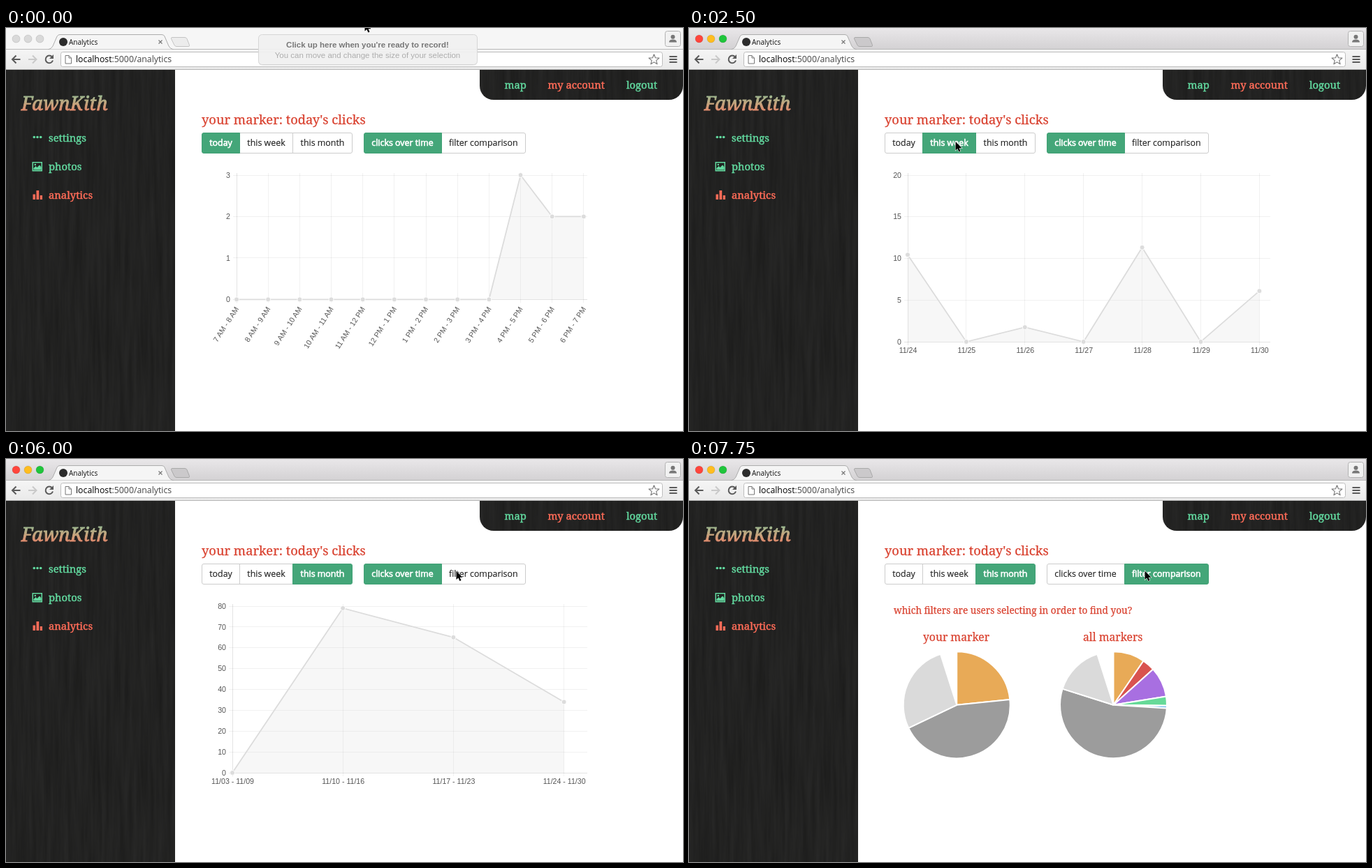
Write an HTML page that moves like this. It is 969 px wide and 578 px high and loops after 8000 ms.

```html
<!DOCTYPE html>
<html lang="en">
<head>
<meta charset="utf-8">
<title>Analytics</title>
<style>
  html, body { margin: 0; width: 100%; height: 100%; overflow: hidden; background: #fff; }
  #stage { position: absolute; left: 0; top: 0; width: 969px; height: 578px; overflow: hidden; }
  svg { position: absolute; left: 0; top: 0; }
  text { white-space: pre; }
  .ui { font-family: "Open Sans", sans-serif; }
  .slab { font-family: "Noto Serif", serif; }
  .red { fill: #d9412f; stroke: #d9412f; stroke-width: .25px; }
  .menu { font-size: 14.8px; stroke-width: .45px; }
  .mint { fill: #62d99f; stroke: #62d99f; }
  .coral { fill: #ff6c58; stroke: #ff6c58; }
  .axis text { font: 10.6px "Liberation Sans", Arial, sans-serif; fill: #555; }
  .grid { stroke: #000; stroke-opacity: .055; }
  .lead { stroke-opacity: .11; }
  .area { fill: #dcdcdc; fill-opacity: .22; }
  .line { fill: none; stroke: #dcdcdc; stroke-width: 1.8; }
  .dot { fill: #dcdcdc; stroke: #fff; }
  .pie path { stroke: #fff; stroke-width: 2; stroke-linejoin: bevel; }
  .icon { fill: none; stroke: #5a5a5a; stroke-width: 2; }

  .btn {
    position: absolute; top: 150px; height: 30px; box-sizing: border-box;
    display: flex; align-items: center; justify-content: center;
    border: 1px solid #ccc; background: #fff; color: #222;
    font: 12.4px "Open Sans", sans-serif; white-space: nowrap; padding-bottom: 1px;
    -webkit-text-stroke: .15px #222;
  }
  .btn.first { border-radius: 3px 0 0 3px; }
  .btn.last { border-radius: 0 3px 3px 0; }
  .btn.on {
    background: #44a679; border-color: #42a176; color: #fff; z-index: 1;
    -webkit-text-stroke: .65px #fff;
  }
  .btn.down {
    background: #d4d4d4; border-color: #7f9fc4; z-index: 2;
    box-shadow: 0 0 0 1.5px #5e9fe8, inset 0 2px 4px rgba(0,0,0,.12);
  }

  #strip { fill: url(#bar); }
  .light { stroke-width: .6; stroke: rgba(0,0,0,.18); }
  .idle #strip { fill: #f6f6f6; }
  .idle .light { fill: #d9d9d9; }
  .idle #newTab { fill: #ececec; stroke: #c4c4c4; }
  #top { z-index: 5; }
  #hint text { font-family: "Liberation Sans", Arial, sans-serif; font-size: 11.5px; text-anchor: middle; }
</style>
</head>
<body>
<div id="stage">
<svg id="base" width="969" height="578">
  <defs>
    <linearGradient id="bar" x2="0" y2="1">
      <stop stop-color="#e9e7e9"/><stop offset="1" stop-color="#d3d1d3"/>
    </linearGradient>
    <linearGradient id="tool" x2="0" y2="1">
      <stop stop-color="#f5f5f5"/><stop offset="1" stop-color="#e9e9e9"/>
    </linearGradient>
    <linearGradient id="brand" gradientUnits="userSpaceOnUse" x1="0" y1="88" x2="0" y2="129">
      <stop stop-color="#7cc9a0"/><stop offset=".5" stop-color="#c6a47d"/><stop offset="1" stop-color="#ff705c"/>
    </linearGradient>
    <filter id="wood" x="0" y="0" width="1" height="1" color-interpolation-filters="sRGB">
      <feTurbulence type="fractalNoise" baseFrequency=".16 .008" numOctaves="4" seed="7"/>
      <feColorMatrix values=".06 0 0 0 .103  .06 0 0 0 .103  .06 0 0 0 .1  0 0 0 0 1"/>
    </filter>
    <clipPath id="tray"><path d="M678 60H969V83A20 20 0 0 1 949 103H698A20 20 0 0 1 678 83Z"/></clipPath>
  </defs>

  <!-- browser window -->
  <rect id="strip" width="969" height="31"/>
  <circle class="light" cx="14.5" cy="15.5" r="5.5" fill="#ff453c"/>
  <circle class="light" cx="31.5" cy="15.5" r="5.5" fill="#ffbd1f"/>
  <circle class="light" cx="48.5" cy="15.5" r="5.5" fill="#1fc53b"/>
  <path d="M0 30.5H969" stroke="#b9b9b9"/>
  <path id="newTab" d="M238 13.5H256Q258 13.5 259 15.5L262.5 24.5Q263 26.5 261 26.5H244Q242 26.5 241 24.5L236.5 15.5Q236 13.5 238 13.5Z" fill="#cbc9cb" stroke="#a9a9a9"/>
  <path d="M60 31Q65 30 67 26L73 12Q74.5 9.5 77 9.5H223Q226 9.5 227 12L233 26Q235 30 240 31Z" fill="#f5f5f5" stroke="#adadad"/>
  <rect y="31" width="969" height="29" fill="url(#tool)"/>
  <path d="M0 59.5H969" stroke="#b4b4b4"/>
  <circle cx="82" cy="20" r="6" fill="#2c2c2c"/>
  <text class="ui" x="90" y="23.5" font-size="10" fill="#111">Analytics</text>
  <path d="M218.5 17.5l5 5m0-5l-5 5" stroke="#777" stroke-width="1.2"/>
  <rect x="943.5" y="4.5" width="22" height="22" rx="3" fill="#f1f1f1" stroke="#b2b2b2"/>
  <circle cx="954.5" cy="12.7" r="3" fill="#777"/>
  <path d="M949 20.5Q949 16.5 954.5 16.5T960 20.5Z" fill="#777"/>
  <path class="icon" d="M20.5 45H9m5.5-5.5L9 45l5.5 5.5"/>
  <path class="icon" d="M32 45h11.5m-5.5-5.5l5.5 5.5-5.5 5.5" style="stroke:#c9c9c9"/>
  <path class="icon" d="M66 41.5A5.3 5.3 0 1 0 67 46.5"/>
  <path d="M68 38v6h-6Z" fill="#5a5a5a"/>
  <rect x="78.5" y="34.5" width="861" height="21" rx="3" fill="#fff" stroke="#bdbdbd"/>
  <path d="M85 39.5h5l3.500 3.500v8h-8.500ZM90 39.500v3.500h3.500" fill="#fff" stroke="#777"/>
  <text class="ui" x="100" y="49" font-size="12.3" fill="#000">localhost<tspan fill="#444">:5000/analytics</tspan></text>
  <path id="star" fill="none" stroke="#777" stroke-width="1.1" stroke-linejoin="round"/>
  <path class="icon" d="M949.5 41h11m-11 4h11m-11 4h11"/>

  <!-- sidebar and account tray -->
  <rect y="60" width="242" height="518" filter="url(#wood)"/>
  <g clip-path="url(#tray)"><rect x="678" y="60" width="291" height="43" filter="url(#wood)"/></g>
  <text class="slab" x="22" y="118" font-size="27.4" font-style="italic" fill="url(#brand)" stroke="url(#brand)" stroke-width=".9">FawnKith</text>
  <g fill="#62d99f">
    <circle cx="40.3" cy="156.5" r="1.8"/><circle cx="45" cy="156.5" r="1.8"/><circle cx="49.7" cy="156.5" r="1.8"/>
    <path fill-rule="evenodd" d="M37.5 192H52V205.5H37.5ZM39 193.5V204H50.5V193.5Z"/>
    <path d="M39.5 203.5V201l3-3 2 2 3.5-3.5 2.5 3V203.5Z"/><circle cx="41.8" cy="196" r="1.3"/>
  </g>
  <path d="M38.5 238.5H42V246H38.5ZM43.5 233H47.2V246H43.5ZM48.7 240H52V246H48.7Z" fill="#ff6c58"/>
  <g class="slab menu">
    <text class="mint" x="61" y="163">settings</text>
    <text class="mint" x="61" y="204">photos</text>
    <text class="coral" x="61" y="245">analytics</text>
    <text class="mint" x="713.5" y="87">map</text>
    <text class="coral" x="775.5" y="87">my account</text>
    <text class="mint" x="888" y="87">logout</text>
  </g>
  <text class="slab red" x="280" y="137.5" font-size="18.3">your marker: today's clicks</text>
  <g id="pies">
    <g class="slab red">
      <text x="293" y="222" font-size="13.6">which filters are users selecting in order to find you?</text>
      <text x="335" y="260.5" font-size="15.7">your marker</text>
      <text x="564" y="260.5" font-size="15.7">all markers</text>
    </g>
  </g>
</svg>

<div id="buttons"></div>

<svg id="top" width="969" height="578">
  <g id="hint">
    <rect x="361" y="10" width="314" height="44" rx="6" fill="#000" opacity=".08"/>
    <rect x="361.5" y="9.5" width="313" height="43" rx="5" fill="#f2f2f2" fill-opacity=".92" stroke="#d6d6d6"/>
    <text x="517.5" y="28.3" font-weight="bold" fill="#777">Click up here when you're ready to record!</text>
    <text x="517.5" y="42.5" fill="#adadad">You can move and change the size of your selection</text>
  </g>
  <path id="cursor" d="M0 0V12.5L2.9 9.9 4.9 14.4 7 13.5 5.1 9.2H9Z" fill="#000" stroke="#fff" stroke-width="1.1" paint-order="stroke"/>
</svg>
</div>

<script>
const LOOP = 8000, STEP = 250;
const $ = id => document.getElementById(id);
const clamp = u => Math.max(0, Math.min(1, u));
const outQuart = u => 1 - (1 - clamp(u)) ** 4;
const smooth = u => (u = clamp(u), u * u * (3 - 2 * u));

function outBounce(u) {
  u = clamp(u);
  const k = 7.5625, d = 2.75;
  if (u < 1 / d) return k * u * u;
  if (u < 2 / d) return k * (u - 1.5 / d) ** 2 + .75;
  if (u < 2.5 / d) return k * (u - 2.25 / d) ** 2 + .9375;
  return k * (u - 2.625 / d) ** 2 + .984375;
}

function add(parent, tag, attrs, text) {
  const el = document.createElementNS("http://www.w3.org/2000/svg", tag);
  for (const key in attrs) el.setAttribute(key, attrs[key]);
  if (text !== undefined) el.textContent = text;
  return parent.appendChild(el);
}

// Point on a circle, angle clockwise from twelve o'clock
const polar = (cx, cy, r, a) =>
  `${(cx + r * Math.sin(a)).toFixed(2)} ${(cy - r * Math.cos(a)).toFixed(2)}`;

function lineChart({ x0, gap, y0, max, tick, labels, data, tilt }) {
  const top = 211, right = 832;
  const root = add($("base"), "g", { class: "axis" });
  const yOf = v => y0 - v / max * (y0 - top);
  const xOf = i => x0 + i * gap;
  const rule = (d, lead) => add(root, "path", { class: lead ? "grid lead" : "grid", d });

  for (let v = 0; v <= max; v += tick) {
    const y = yOf(v);
    rule(`M${x0 - 5} ${Math.floor(y) + .5}H${right}`, v === 0);
    add(root, "text", { x: x0 - 9, y: y + 3.7, "text-anchor": "end" }, v);
  }
  labels.forEach((label, i) => {
    const x = xOf(i);
    rule(`M${Math.floor(x) + .5} 208V${y0 + 5}`, i === 0);
    add(root, "text", tilt
      ? { "text-anchor": "end", dy: ".35em", transform: `translate(${x + .5} ${y0 + 11.5}) rotate(${-tilt})` }
      : { "text-anchor": "middle", x: x + .5, y: y0 + 16.3 }, label);
  });

  const area = add(root, "polygon", { class: "area" });
  const line = add(root, "polyline", { class: "line" });
  const dots = data.map((_, i) => add(root, "circle", { class: "dot", cx: xOf(i), r: 3.5 }));

  return {
    root,
    draw(p) {
      const ys = data.map(v => yOf(v * p));
      const pts = ys.map((y, i) => `${xOf(i)},${y}`).join(" ");
      line.setAttribute("points", pts);
      area.setAttribute("points", `${x0},${y0} ${pts} ${xOf(data.length - 1)},${y0}`);
      dots.forEach((dot, i) => dot.setAttribute("cy", ys[i]));
    }
  };
}

function pieChart(cx, slices) {
  const cy = 352.8, r = 76.5;
  const root = add($("pies"), "g", { class: "pie" });
  const paths = slices.map(([fill]) => add(root, "path", { fill }));
  return p => {
    let a = 0;
    slices.forEach(([, end], i) => {
      const b = end * p * 2 * Math.PI;
      paths[i].setAttribute("d", `M${cx} ${cy}L${polar(cx, cy, r, a)}` +
        `A${r} ${r} 0 ${b - a > Math.PI ? 1 : 0} 1 ${polar(cx, cy, r, b)}Z`);
      a = b;
    });
  };
}

const hour = h => `${h % 12 || 12} ${h < 12 ? "AM" : "PM"}`;
const charts = [
  lineChart({
    x0: 330, gap: 45.17, y0: 389.3, max: 3, tick: 1, tilt: 57,
    labels: Array.from({ length: 12 }, (_, i) => `${hour(i + 7)} - ${hour(i + 8)}`),
    data: [0, 0, 0, 0, 0, 0, 0, 0, 0, 3, 2, 2]
  }),
  lineChart({
    x0: 313, gap: 83.9, y0: 450, max: 20, tick: 5,
    labels: Array.from({ length: 7 }, (_, i) => `11/${24 + i}`),
    data: [12, 0, 2, 0, 13, 0, 7]
  }),
  lineChart({
    x0: 324, gap: 158.2, y0: 450, max: 80, tick: 10,
    labels: ["11/03 - 11/09", "11/10 - 11/16", "11/17 - 11/23", "11/24 - 11/30"],
    data: [0, 79, 65, 34]
  })
];
const chartStart = [-2000, 2100, 3850];

// Each slice: colour and the share of the circle where it ends
const pies = [
  pieChart(383.2, [["#e8aa57", .246], ["#9c9c9c", .714], ["#dadada", 1]]),
  pieChart(607.5, [["#e8aa57", .1], ["#d9534f", .14], ["#a86fe1", .236], ["#66da98", .265],
    ["#6db9ea", .273], ["#9c9c9c", .84], ["#dadada", 1]])
];

const buttons = [
  ["today", 280, 55, "first"], ["this week", 334, 77, ""], ["this month", 410, 86, "last"],
  ["clicks over time", 511.5, 112, "first"], ["filter comparison", 622.5, 121.5, "last"]
].map(([label, left, width, side]) => {
  const el = document.createElement("div");
  el.className = `btn ${side}`;
  el.textContent = label;
  el.style.left = left + "px";
  el.style.width = width + "px";
  return $("buttons").appendChild(el);
});

$("star").setAttribute("d", "M" + Array.from({ length: 10 }, (_, i) =>
  polar(927.5, 45.5, i % 2 ? 3.4 : 7.8, i * Math.PI / 5)).join("L") + "Z");

// Pointer trips: start, end, destination
const home = [513.5, -8];
const trips = [[0, 1250, 381.5, 163], [3000, 3750, 443.5, 163], [5250, 6100, 652.5, 160.5]];
const presses = { 2000: 1, 3750: 2, 6250: 4 };

function render(t) {
  const range = t >= 4000 ? 2 : t >= 2250 ? 1 : 0;
  const compare = t >= 6500;

  $("stage").classList.toggle("idle", t < 1500);
  $("hint").setAttribute("opacity", 1 - clamp(t / 900));

  let [x, y] = home;
  for (const [from, to, tx, ty] of trips) {
    const u = smooth((t - from) / (to - from));
    x += (tx - x) * u;
    y += (ty - y) * u;
  }
  $("cursor").setAttribute("transform", `translate(${x} ${y})`);

  buttons.forEach((el, i) => {
    el.classList.toggle("on", i === range || i === (compare ? 4 : 3));
    el.classList.toggle("down", presses[t] === i);
  });

  charts.forEach((chart, i) => {
    const shown = i === range && !compare;
    chart.root.style.display = shown ? "" : "none";
    if (shown) chart.draw(outQuart((t - chartStart[i]) / 1000));
  });
  $("pies").style.display = compare ? "" : "none";
  if (compare) pies.forEach(draw => draw(outBounce((t - 6294) / 1692)));
}

const begin = performance.now();
let shownAt = -1;
function tick() {
  const t = Math.floor((performance.now() - begin) % LOOP / STEP) * STEP;
  if (t !== shownAt) render(shownAt = t);
  requestAnimationFrame(tick);
}
tick();
</script>
</body>
</html>
```
